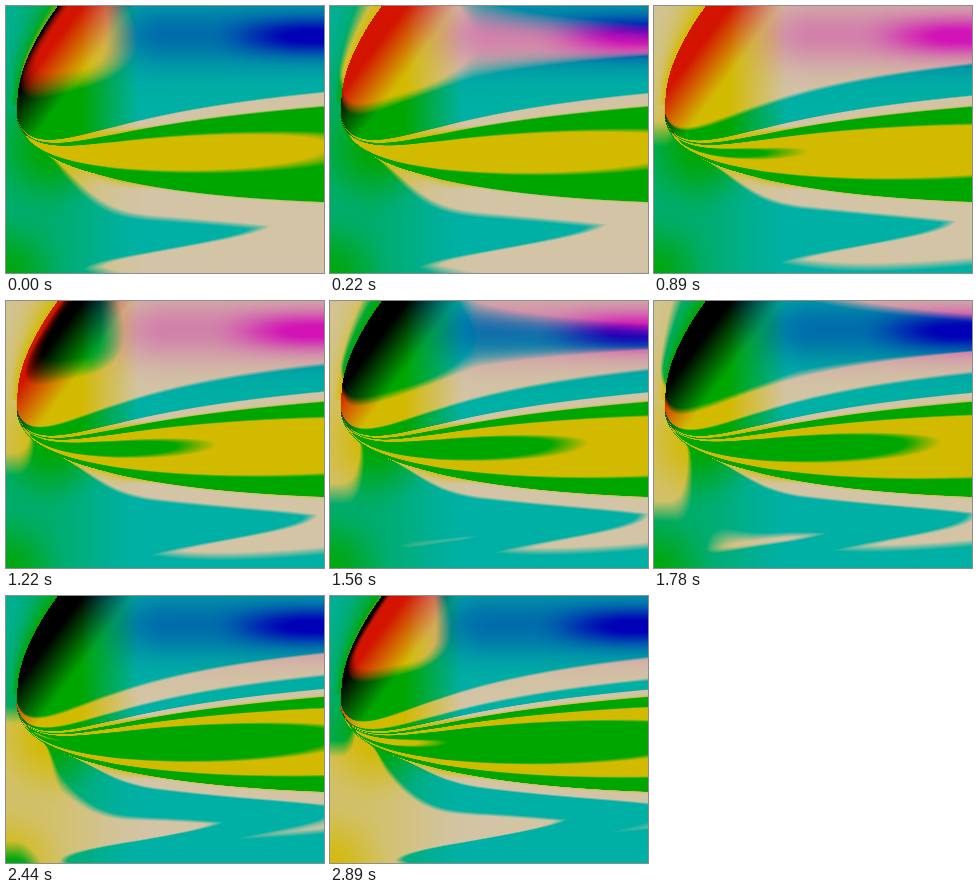
An HTML page with a canvas that plays this animation: 318 px wide and 267 px high, repeating every 3 s.

```html
<!DOCTYPE html>
<html lang="en">
<head>
<meta charset="utf-8">
<title>Flowing bands</title>
<style>
  html, body { margin: 0; width: 100%; height: 100%; overflow: hidden; background: #000; }
  canvas { display: block; width: 100vw; height: 100vh; }
</style>
</head>
<body>
<canvas width="318" height="267"></canvas>
<script>
const start = performance.now();
const W = 318, H = 267, LOOP = 3000, STEPS = 27;
const LEFT = 9;                      // where the spine of the fan begins
const NODE = { x: 45, y: 142 };      // where the bands pinch together
const ctx = document.querySelector('canvas').getContext('2d');
const image = ctx.createImageData(W, H);

const clamp = v => Math.min(1, Math.max(0, v));
const mix = (a, b, t) => a + (b - a) * t;
const smooth = (a, b, v) => { const t = clamp((v - a) / (b - a)); return t * t * (3 - 2 * t); };
const bell = (v, centre, width) => Math.exp(-(((v - centre) / width) ** 2));

// Left rim of the dark crescent.
const rim = y => 11 + 40 * (Math.max(0, 92 - y) / 92) ** 1.7;

// Middle line of the fan: curls round on the left, rises slowly to the right.
const spine = x => {
  const u = Math.min(1, Math.sqrt(Math.max(0, x - LEFT)) / 9);
  return 146 - 47 * (1 - u) ** 2.3 - .035 * Math.max(0, x - 110);
};

// Relative opening of the fan, about 1 at the right edge.
const spread = x => {
  const d = Math.max(0, x - LEFT) ** 1.5;
  return .025 + 1.37 * d / (d + 2000);
};

const lobeDepth = x => (.00205 * x - 1.77) * smooth(5, 30, x);
const lobe = (x, r) => lobeDepth(x) * (1 - r ** 2.2);
const lobeTop = x => 37 * spread(x);
const lobeBottom = x => 55 * spread(x);

// Contours above the lobe: level, height at the right edge, curvature.
const levels = [[0, 37, 1], [1.02, 53, .95], [1.54, 78, .75], [1.8, 87, .55]];

function outside(x, y) {
  return 1.73 - .0036 * Math.max(0, y - 88)
    + .33 * clamp(x / rim(y)) ** 1.3 * (1 - smooth(60, 100, y));
}

function above(x, y) {
  const height = spine(x) - y, w = spread(x);
  const offsets = levels.map(([, h, power]) => h * w ** power);
  const k = offsets.findIndex(o => height < o);
  if (k > 0) {
    const t = (height - offsets[k - 1]) / (offsets[k] - offsets[k - 1]);
    return mix(levels[k - 1][0], levels[k][0], t);
  }
  const ridgeY = 25 + .055 * x;
  const ridge = 1.97 + .18 * (1 - smooth(80, 150, x));
  const dent = .2 * Math.exp(-(x - rim(y)) / 6);
  if (y < ridgeY) {
    const drop = .32 * clamp((x - 100) / 220);
    return ridge - drop * (1 - y / ridgeY) ** 2 - dent;
  }
  const base = offsets[3], t = clamp((height - base) / (spine(x) - ridgeY - base));
  return mix(1.8, ridge, 1 - (1 - t) ** 3) - dent * t;
}

function below(x, y) {
  const top = spine(x) + lobeBottom(x);
  const ridgeY = 254 - .132 * x, troughY = ridgeY + 19;
  const crest = 1.34 - .75 * (Math.max(0, x - 130) / 188) ** 1.5 - .1 * bell(x, 38, 25);
  const peak = mix(outside(0, y), crest, smooth(10, 60, x));
  if (y < ridgeY) return peak * clamp((y - top) / (ridgeY - top)) ** (.62 * smooth(20, 150, x));
  const trough = Math.min(peak, .45 + .5 * Math.exp((85 - x) / 90));
  return mix(peak, trough, smooth(ridgeY, troughY, y)) + .01 * Math.max(0, y - troughY);
}

function phaseAt(x, y) {
  const height = spine(x) - y;
  if (height < -lobeBottom(x)) return below(x, y);
  if (x < rim(y)) return outside(x, y);
  if (height < 0) return lobe(x, -height / lobeBottom(x));
  return height < lobeTop(x) ? lobe(x, height / lobeTop(x)) : above(x, y);
}

// Steady green and blue of a point; red is what moves.
function baseColour(x, y, phase) {
  const over = y < spine(x), inside = over && x >= rim(y);
  const nodeDistance = Math.hypot(x - NODE.x, y - NODE.y);
  let dark = 0, mask;
  if (inside) {
    dark = .38 * smooth(70, 160, x) * bell(y, 28, 32) + .7 * smooth(200, 300, x) * bell(y, 30, 17);
    mask = clamp((x - 74) / 58);
  } else {
    mask = smooth(0, 70, nodeDistance)
      * (.64 + .36 * smooth(30, 140, x) + .25 * (1 - smooth(0, 120, y)))
      * mix(.15, 1, smooth(0, 65, Math.hypot(x, y - H)));
    if (over) mask *= 1 - clamp(x / rim(y)) ** 2;
  }
  dark = clamp(dark);
  const amount = mask * smooth(-.05, .7 - .5 * smooth(90, 160, x), phase);
  const crescent = inside ? clamp((x + .75 * y - 76) / 50) : 1;
  return [(166 + 10 * amount) * crescent * (1 - dark), (164 + 18 * dark) * amount];
}

const points = [];
for (let y = 0; y < H; y++) {
  for (let x = 0; x < W; x++) {
    const phase = phaseAt(x, y);
    const [green, blue] = baseColour(x, y, phase);
    points.push({ phase, green, blue });
  }
}

function draw(step) {
  const scale = 1 + step / STEPS;
  points.forEach(({ phase, green, blue }, i) => {
    const red = clamp(2.8 * Math.sin(Math.PI * phase * scale));
    image.data.set([210 * red, green + 20 * red, blue, 255], i * 4);
  });
  ctx.putImageData(image, 0, 0);
}

let shown = -1;
function tick() {
  const t = (performance.now() - start) % LOOP;
  const step = Math.min(STEPS - 1, Math.floor((t + 5) * STEPS / LOOP));
  if (step !== shown) draw(shown = step);
  requestAnimationFrame(tick);
}
tick();
</script>
</body>
</html>
```
